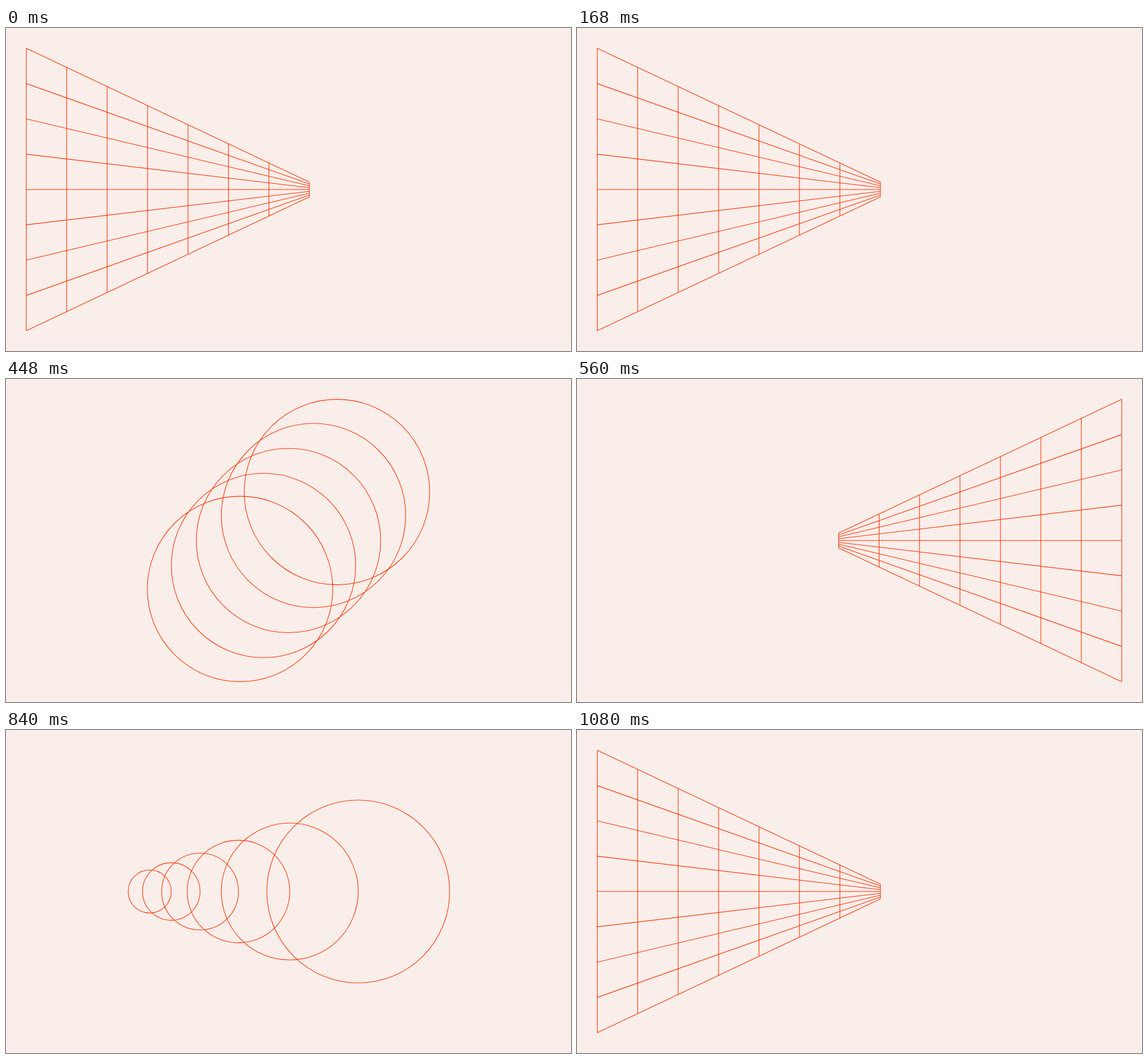
Recreate the animation shown at these times as an HTML page with a canvas. Size 990 by 566 pixels, loop 1120 ms.

```html
<!DOCTYPE html>
<html lang="en">
<head>
<meta charset="utf-8">
<title>Line shapes</title>
<style>
html, body { margin: 0; width: 100%; height: 100%; overflow: hidden; background: #faeeea; }
canvas { display: block; width: 990px; height: 566px; }
</style>
</head>
<body>
<canvas id="stage" width="990" height="566"></canvas>
<script>
const W = 990, H = 566, CX = W / 2, CY = H / 2;
const LOOP = 1120;
const ctx = document.getElementById('stage').getContext('2d');

function line(x1, y1, x2, y2) {
  ctx.moveTo(x1, y1);
  ctx.lineTo(x2, y2);
}

function circle(x, y, r) {
  ctx.moveTo(x + r, y);
  ctx.arc(x, y, r, 0, Math.PI * 2);
}

// Perspective grid from a tall edge to a short one
function grid(tallX, shortX) {
  const tall = 247.5, short = 13, cols = 7, rows = 4;
  for (let i = 0; i <= cols; i++) {
    const k = i / cols;
    const x = tallX + (shortX - tallX) * k;
    const h = tall + (short - tall) * k;
    line(x, CY - h, x, CY + h);
  }
  for (let i = -rows; i <= rows; i++) {
    const k = i / rows;
    line(tallX, CY + tall * k, shortX, CY + short * k);
  }
}

function diagonalRings() {
  for (let i = -2; i <= 2; i++) {
    const outer = Math.abs(i) === 2;
    const d = Math.sign(i) * (outer ? 84.9 : 43.8);
    circle(CX + d, CY - d, outer ? 162.5 : 161.5);
  }
}

// Each smaller ring ends at the centre of the next one
function shrinkingRings() {
  let x = 617.2, r = 160.2;
  for (let i = 0; i < 6; i++) {
    circle(x, CY, r);
    r *= 0.749;
    x -= r;
  }
}

function draw(t) {
  ctx.fillStyle = '#faeeea';
  ctx.fillRect(0, 0, W, H);
  ctx.strokeStyle = '#ff3300';
  ctx.lineWidth = 1.1;
  ctx.beginPath();
  if (t < 280 || t >= 1080) grid(35.5, 531.5);
  else if (t < 560) diagonalRings();
  else if (t < 840) grid(954.5, 458.5);
  else shrinkingRings();
  ctx.stroke();
}

const start = performance.now();
function tick() {
  draw((performance.now() - start) % LOOP);
  requestAnimationFrame(tick);
}
tick();
</script>
</body>
</html>
```
